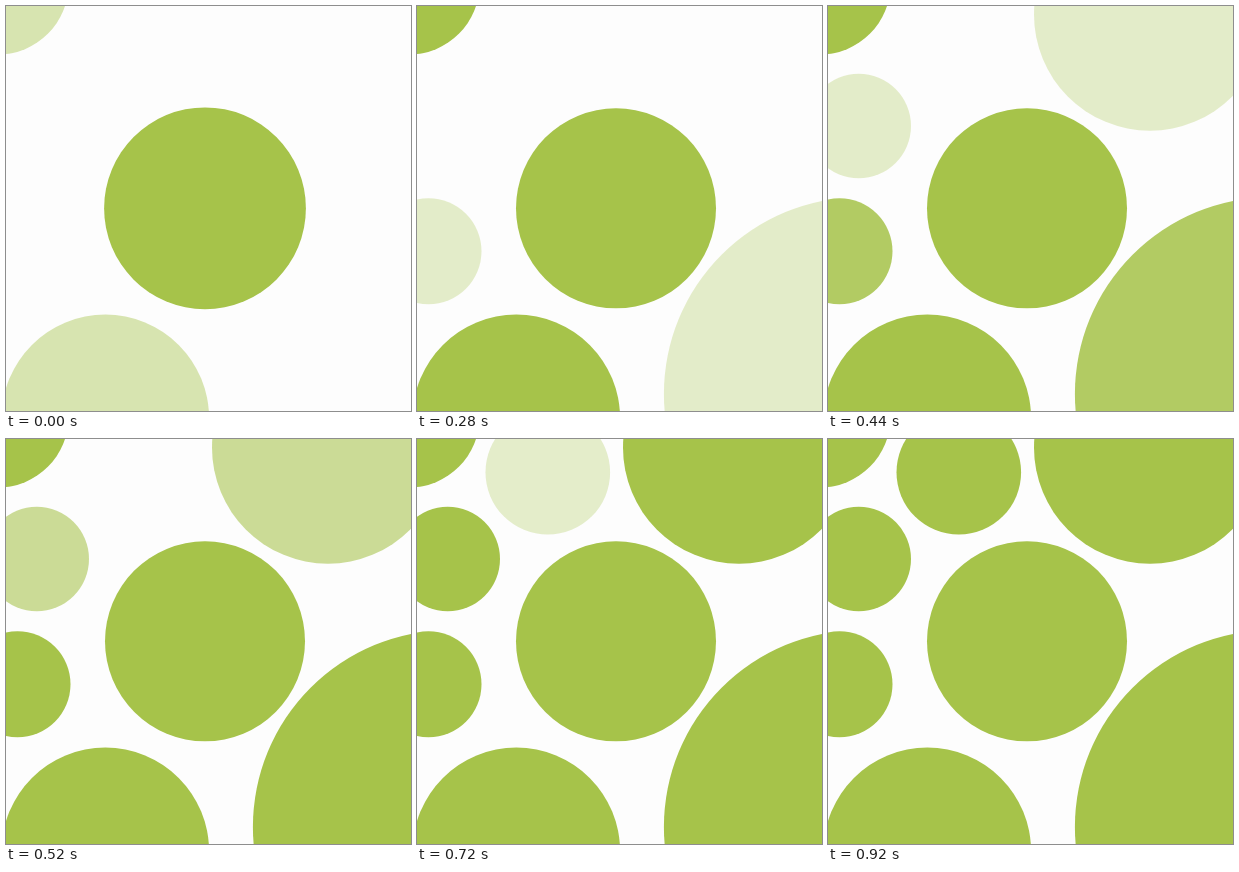
An HTML page that plays this animation: 405 by 405 pixels, repeating every 1000 ms.

```html
<!DOCTYPE html>
<html lang="en">
<head>
<meta charset="utf-8">
<title>Green dots</title>
<style>
  html, body { margin: 0; height: 100%; overflow: hidden; background: #fdfdfd; }
  svg { display: block; width: 100%; height: 100%; }
</style>
</head>
<body>
<svg viewBox="0 0 405 405" fill="#a6c34a">
  <circle id="halo" cx="199" cy="202.3" r="100.9"/>
  <circle cx="199" cy="202.3" r="100"/>
  <g data-start="-120">
    <circle cx="-8" cy="-22" r="70.5"/>
    <circle cx="99.3" cy="412.3" r="103.8"/>
  </g>
  <g data-start="200">
    <circle cx="11.5" cy="245.2" r="53"/>
    <circle cx="443.9" cy="388" r="197"/>
  </g>
  <g data-start="360">
    <circle cx="30.7" cy="120" r="52.3"/>
    <circle cx="322" cy="8.7" r="116"/>
  </g>
  <g data-start="640">
    <circle cx="130.8" cy="33.3" r="62.3"/>
  </g>
</svg>
<script>
  const LOOP = 1000, STEP = 40, FADE = 280;
  const groups = document.querySelectorAll('g');
  const halo = document.getElementById('halo');
  const clamp = v => Math.min(1, Math.max(0, v));

  function draw(now) {
    const t = Math.floor(now % LOOP / STEP) * STEP;
    for (const g of groups) {
      g.setAttribute('opacity', clamp((t - g.dataset.start) / FADE));
    }
    halo.setAttribute('opacity', clamp(1 - t / 200));
  }

  const begin = performance.now();
  function tick() {
    draw(performance.now() - begin);
    requestAnimationFrame(tick);
  }
  tick();
</script>
</body>
</html>
```
